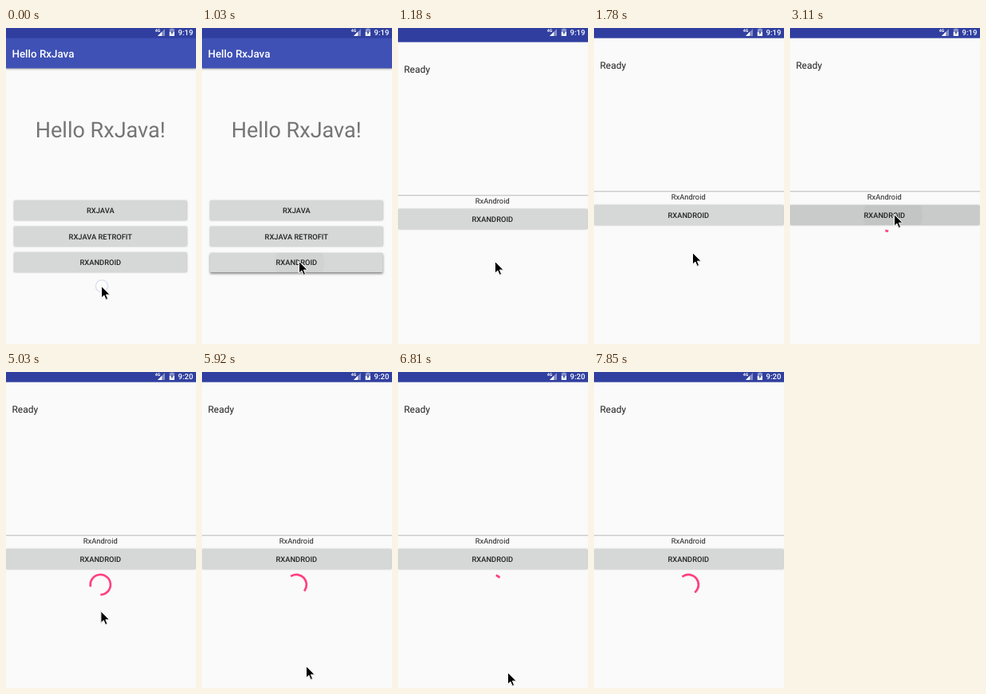
These frames come from a looping animation (238 by 396 pixels, 8 s). An HTML page:

```html
<!DOCTYPE html>
<html lang="en">
<head>
<meta charset="utf-8">
<title>Hello RxJava</title>
<style>
  html, body { margin: 0; width: 100%; height: 100%; overflow: hidden; background: #fafafa; }
  svg { display: block; width: 238px; height: 396px; font-family: Roboto, sans-serif; text-rendering: geometricPrecision; }
  .page { fill: #fafafa; }
  .status { fill: #303f9f; }
  .btn { fill: #d6d7d7; filter: drop-shadow(0 .8px .9px rgba(0, 0, 0, .3)); }
  .btn.raised { filter: drop-shadow(0 2px 1.6px rgba(0, 0, 0, .45)); }
  .label { font-size: 9.35px; font-weight: 500; fill: #222; text-anchor: middle; }
  .bar { fill: #3f51b5; filter: drop-shadow(0 1px 1.2px rgba(0, 0, 0, .35)); }
  .small { font-size: 9.35px; fill: #212121; text-anchor: middle; }
</style>
</head>
<body>
<svg viewBox="0 0 238 396">
  <defs>
    <clipPath id="clipA"><rect x="10" y="281.5" width="217" height="24.5" rx="1.3"/></clipPath>
    <clipPath id="clipB"><rect x="0" y="222" width="237.6" height="25" rx="1.3"/></clipPath>
  </defs>

  <g id="home">
    <rect class="page" width="238" height="396"/>
    <rect class="bar" y="12" width="238" height="38.5"/>
    <rect class="status" width="238" height="12.7"/>
    <text x="7.4" y="37" font-size="13.4" font-weight="500" fill="#fff">Hello RxJava</text>
    <text x="118.2" y="137.4" font-size="27.05" fill="#757575" text-anchor="middle">Hello RxJava!</text>
    <rect class="btn" x="10" y="216.5" width="216.6" height="24.5" rx="1.3"/>
    <rect class="btn" x="10" y="249" width="216.6" height="24.5" rx="1.3"/>
    <rect class="btn" id="btnA" x="10" y="281.5" width="216.6" height="24.5" rx="1.3"/>
    <g clip-path="url(#clipA)"><circle id="rippleA" cx="122" cy="294"/></g>
    <text class="label" x="118.3" y="232.3">RXJAVA</text>
    <text class="label" x="118.3" y="264.8">RXJAVA RETROFIT</text>
    <text class="label" x="118.3" y="297.2">RXANDROID</text>
  </g>

  <g id="detail">
    <rect class="page" width="238" height="396"/>
    <rect class="status" width="238" height="12.7"/>
    <text x="7.4" y="51" font-size="12" fill="#212121">Ready</text>
    <rect y="204.3" width="238" height="1" fill="#b8b8b8"/>
    <text class="small" x="118.3" y="215.3">RxAndroid</text>
    <rect class="btn" y="222" width="237.6" height="25" rx="1.3"/>
    <g clip-path="url(#clipB)">
      <rect id="shade" y="222" width="238" height="25"/>
      <circle id="rippleB" cx="129" cy="235"/>
    </g>
    <text class="label" x="118.3" y="237.9">RXANDROID</text>
    <path id="spin" fill="none" stroke="#ff4081" stroke-width="2.7" stroke-linecap="square"/>
  </g>

  <g fill="#fff">
    <path d="M199 1V10H190Z" opacity=".4"/>
    <path d="M195.2 4.8V10H190Z"/>
    <text x="186.8" y="4.9" font-size="5.2" font-weight="700">4G</text>
    <path d="M206.5 1.2V.6H209.3V1.2H211V10H204.8V1.2Z" opacity=".45"/>
    <path d="M204.8 5H211V10H204.8Z"/>
    <path d="M208.6 2.5L206.3 6.2H207.7L207.2 9L209.6 5.3H208.2Z" fill="#303f9f"/>
    <text id="clock" x="234.3" y="8.9" font-size="9.5" font-weight="500" text-anchor="end">9:19</text>
  </g>

  <circle id="ring" cx="120" cy="323.5" r="7.6" fill="#fff" fill-opacity=".6" stroke="#dcddf2" stroke-width="1.4"/>
  <path id="pointer" d="M.5.5V15.2L3.9 12.1L6.2 17.4L8.6 16.4L6.4 11.2H11.1Z" stroke="#fff" stroke-width="1"
    style="filter: drop-shadow(0 .8px .7px rgba(0, 0, 0, .3))"/>
</svg>
<script>
const LOOP = 8000, STEP = LOOP / 54;
const $ = id => document.getElementById(id);
const set = (id, attrs) => { for (const k in attrs) $(id).setAttribute(k, attrs[k]); };

// Pointer tip: step, x, y
const track = [
  [0, 119, 323], [1, 119, 323], [5, 121, 292], [11, 121, 292], [12, 123, 281],
  [17, 130, 233], [23, 130, 233], [27, 116, 286], [30, 116, 288], [35, 119, 302],
  [40, 130, 368], [43, 130, 368], [45, 137, 376], [47, 137, 376]
];

function pointerAt(n) {
  const i = Math.max(1, track.findIndex(k => k[0] >= n));
  const [a, ax, ay] = track[i - 1], [b, bx, by] = track[i];
  const p = (n - a) / (b - a);
  return [ax + (bx - ax) * p, ay + (by - ay) * p];
}

const cubic = (s, a, b, c, d) => {
  const r = 1 - s;
  return a * r * r * r + 3 * b * s * r * r + 3 * c * s * s * r + d * s * s * s;
};

// Ease 0 to 1 along a curve whose x controls are a, b, c, d
function ease(u, a, b, c, d) {
  if (u <= a) return 0;
  if (u >= d) return 1;
  let lo = 0, hi = 1;
  for (let i = 0; i < 24; i++) {
    const mid = (lo + hi) / 2;
    if (cubic(mid, a, b, c, d) < u) lo = mid; else hi = mid;
  }
  return cubic(lo, 0, 0, 1, 1);
}

function spinner(ms) {
  if (ms < 0) return "";
  const cycle = ms / 1333, u = cycle % 1;
  const turn = cycle * 144 + u * 90;
  const from = turn + 270 * ease(u, .5, .7, .6, 1);
  const to = Math.max(turn + 270 * ease(u, 0, .2, .1, .5), from + .5);
  const at = deg => {
    const a = deg * Math.PI / 180;
    return (118.3 + 12.6 * Math.sin(a)).toFixed(2) + " " + (266.5 - 12.6 * Math.cos(a)).toFixed(2);
  };
  return `M${at(from)}A12.6 12.6 0 ${to - from > 180 ? 1 : 0} 1 ${at(to)}`;
}

function render(n) {
  const pressed = n === 6 || n === 7;
  set("detail", { visibility: n < 8 ? "hidden" : "visible", transform: `translate(0 ${n === 8 ? 5 : 0})` });
  $("btnA").classList.toggle("raised", pressed);
  set("rippleA", { r: n === 6 ? 14 : 31, opacity: pressed ? .025 : 0 });
  set("shade", { opacity: { 20: .03, 21: .06, 22: .03 }[n] || 0 });
  set("rippleB", { r: n === 20 ? 16 : 37, opacity: { 20: .03, 21: .03, 22: .015 }[n] || 0 });
  set("spin", { d: spinner((n * STEP - 3050) * 1.014) });
  set("ring", { visibility: n ? "hidden" : "visible" });
  $("clock").textContent = n < 24 ? "9:19" : "9:20";
  const gone = n > 46;
  set("pointer", { visibility: gone ? "hidden" : "visible" });
  if (!gone) set("pointer", { transform: `translate(${pointerAt(n)})` });
}

let shown = -1;
const start = performance.now();
function tick() {
  const t = (performance.now() - start) % LOOP;
  const n = Math.min(53, Math.floor((t + 16) / STEP));
  if (n !== shown) render(shown = n);
  requestAnimationFrame(tick);
}
tick();
</script>
</body>
</html>
```
